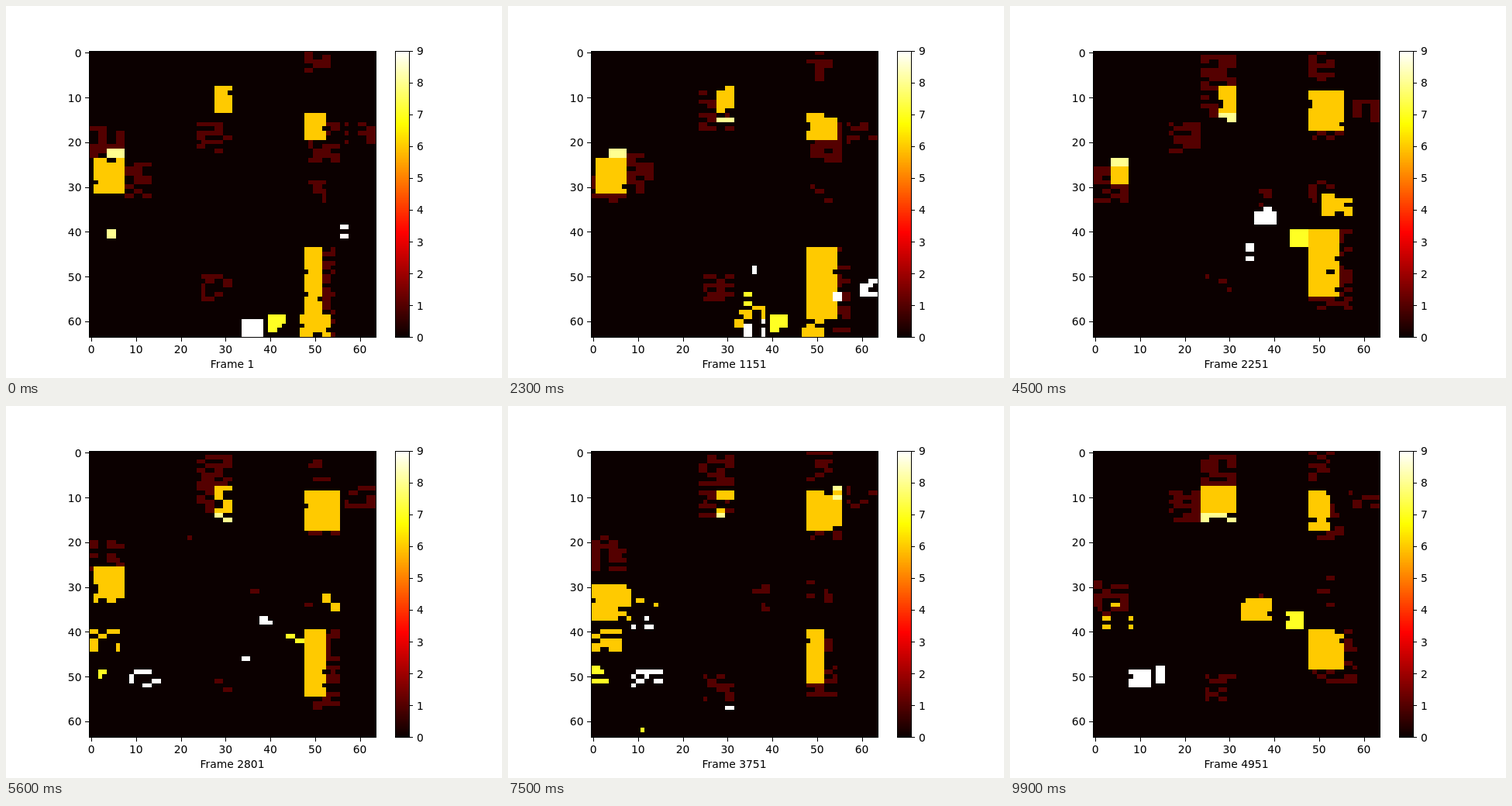
Animation of 640 by 480 pixels, one loop 10 s. Source, as an HTML page with a canvas:

```html
<!DOCTYPE html>
<html lang="en">
<head>
<meta charset="utf-8">
<title>Heat map</title>
<style>
html, body { margin: 0; width: 640px; height: 480px; overflow: hidden; background: #fff; }
canvas, svg { position: absolute; left: 0; top: 0; display: block; }
text { font: 13.889px "DejaVu Sans", sans-serif; fill: #000; }
</style>
</head>
<body>
<canvas id="plot" width="640" height="480"></canvas>
<svg id="labels" width="640" height="480"></svg>
<script>
const N = 64, LEFT = 107.2, TOP = 57.6, SIZE = 369.6;
const BAR_X = 502, BAR_W = 18;
const STEP = 100, LOOP = 10000;
const DARK = 1, GOLD = 6, LEMON = 7, CREAM = 8, WHITE = 9;
const ctx = document.getElementById('plot').getContext('2d');
const svg = document.getElementById('labels');
const grid = new Uint8Array(N * N);

function hash(x, y, seed) {
  let n = Math.imul(x + 11, 374761393) ^ Math.imul(y + 5, 668265263) ^ Math.imul(seed + 1, 1274126177);
  n = Math.imul(n ^ (n >>> 13), 1103515245);
  return ((n ^ (n >>> 16)) >>> 0) / 4294967296;
}

// Each pair of cells draws a new value at its own moment.
function noise(x, y, t) {
  const pair = x >> 1;
  return hash(pair, y, 2 + Math.floor(t / 1.5 + hash(pair, y, 1)));
}

// Smooth change from a to b between times t0 and t1.
function glide(t, a, b, t0, t1) {
  const u = Math.min(1, Math.max(0, (t - t0) / (t1 - t0)));
  return a + (b - a) * u * u * (3 - 2 * u);
}

const bump = (t, mid, width) => Math.exp(-(((t - mid) / width) ** 2));
const wave = (t, period) => Math.cos(2 * Math.PI * t / period);

// A ragged rectangle of one level.
function patch(t, level, x, y, w, h, density = 1) {
  const x0 = Math.round(x), y0 = Math.round(y);
  const x1 = Math.min(N, Math.round(x + w)), y1 = Math.min(N, Math.round(y + h));
  for (let r = y0; r < y1; r++) {
    for (let c = x0; c < x1; c++) {
      const rim = r === y0 || r === y1 - 1 || c === x0 || c === x1 - 1;
      if (noise(c, r, t) < density - (rim ? 0.08 : 0)) grid[r * N + c] = level;
    }
  }
}

// A cluster dissolves at each stop [time, column, row] and forms at the next.
function roam(t, level, w, h, stops) {
  stops.forEach(([start, x, y], i) => {
    const next = stops[i + 1];
    const rise = i ? glide(t, 0, 1, start - 0.5, start + 0.5) : 1;
    const fall = next ? glide(t, 1, 0, next[0] - 0.5, next[0] + 0.5) : 1;
    patch(t, level, x, y, w, h, 0.95 * rise * fall);
  });
}

function upperRight(t) {
  const y = glide(t, 14, 9, 3.2, 4.5);
  const w = glide(t, 5, 8, 1.2, 3) - glide(t, 0, 3, 8.5, 9.8);
  patch(t, DARK, 48, 0, 6, 7, 0.45);
  patch(t, DARK, 49, y + 2, 7, 9, 0.6);
  patch(t, DARK, 57, glide(t, 16, 8, 3, 5.5), 7, 5, 0.4);
  patch(t, DARK, 48, 28, 6, 7, 0.25);
  patch(t, GOLD, 48, y, w, glide(t, 6, 9, 3.2, 4.5), 0.98);
  patch(t, CREAM, 52, 8, 4, 3, 0.8 * bump(t, 6.7, 0.8));
}

function lowerRight(t) {
  const y = glide(t, 44, 40, 3.2, 4.5);
  const end = glide(t, 64, 55, 1.6, 3) - glide(t, 0, 6, 6.8, 8.2);
  const w = 6 - 2 * wave(t, 7);
  patch(t, DARK, 48, y, w + 3, end - y + 3, 0.5);
  patch(t, GOLD, 48, y, w, end - y, 0.98);
}

function upperMiddle(t) {
  const x = glide(t, 28, 24, 7, 9.5);
  const dip = bump(t, 6.7, 1);
  patch(t, DARK, 24, glide(t, 16, 1, 1.5, 3.2), 8, glide(t, 7, 14, 1.5, 4), 0.6);
  patch(t, DARK, 17, glide(t, 16, 9, 5, 9.5), 7, 7, 0.7 * (bump(t, 4.5, 0.8) + bump(t, 9.9, 0.9)));
  patch(t, GOLD, x, 8, 32 - x, 6, 0.98 - 0.9 * dip);
  patch(t, CREAM, x, 14, 32 - x, 2, glide(t, 0.1, 1, 1.5, 3.2) - dip);
}

function leftSide(t) {
  const x = 1 + 3 * bump(t, 4.5, 0.8) - glide(t, 0, 1, 5, 6.5);
  const y = glide(t, 24, 29, 4.8, 6.5) + glide(t, 0, 4, 7, 8.4);
  const fade = glide(t, 0.97, 0.1, 8.7, 9.8);
  patch(t, DARK, 8, glide(t, 24, 20, 1.8, 3.2), 6, 9, glide(t, 0.6, 0, 3.2, 4.5));
  patch(t, DARK, 0, 23 - 6 * wave(t, 6.7), 8, 8, 0.6);
  patch(t, GOLD, x, y, 8 - x + glide(t, 0, 2, 7, 8.4), 8 - 4 * bump(t, 3.7, 0.9), fade);
  patch(t, CREAM, 4, glide(t, 22, 24, 2, 3.2), 4, 2, glide(t, 1, 0, 4.8, 5.8));
  patch(t, CREAM, 4, 40, 4, 2, glide(t, 0.9, 0, 1.5, 2.5));
}

function centre(t) {
  patch(t, DARK, 25, 50, 7, 6, 0.6 - 0.5 * bump(t, 5, 2));
  patch(t, DARK, 36, 30, 4, 7, 0.5 * bump(t, 6.5, 2.5));
}

function travellers(t) {
  roam(t, GOLD, 7, 5, [[0, 47, 59], [2.3, 32, 57], [3.9, 51, 32], [5.6, 0, 40], [7.6, 8, 32], [9.2, 33, 33]]);
  roam(t, LEMON, 4, 4, [[0, 40, 59], [2.3, 32, 54], [3.9, 44, 40], [5.6, 0, 48], [7.6, 11, 60], [9.2, 43, 36]]);
  roam(t, WHITE, 5, 4, [[0, 34, 60], [2.3, 60, 51], [3.9, 36, 35], [5.6, 9, 49], [7.6, 9, 36], [9.2, 8, 49]]);
  roam(t, WHITE, 2, 4, [[0, 56, 39], [0.8, 54, 52], [2.3, 35, 48], [3.9, 34, 43], [5.6, 14, 48], [7.6, 30, 57], [9.2, 14, 48]]);
}

const regions = [upperRight, lowerRight, upperMiddle, leftSide, centre, travellers];

function hot(u) {
  const byte = v => Math.round(255 * Math.min(1, Math.max(0, v)));
  const r = 0.0416 + 2.6253 * u, g = (u - 0.3651) / 0.381, b = (u - 0.746) / 0.254;
  return `rgb(${byte(r)},${byte(g)},${byte(b)})`;
}

const shade = Array.from({ length: 10 }, (_, v) => hot(Math.min(255, Math.floor(v / 9 * 256)) / 255));

function bar(x, y, w, h, color = '#000') {
  ctx.fillStyle = color;
  ctx.fillRect(x, y, w, h);
}

function outline(x, y, w, h) {
  bar(x, y, w, 1);
  bar(x, y + h - 1, w, 1);
  bar(x, y, 1, h);
  bar(x + w - 1, y, 1, h);
}

function label(str, x, y, anchor) {
  const el = document.createElementNS(svg.namespaceURI, 'text');
  el.setAttribute('x', x);
  el.setAttribute('y', y);
  el.setAttribute('text-anchor', anchor);
  el.textContent = str;
  svg.append(el);
  return el;
}

function drawAxes() {
  bar(0, 0, 640, 480, '#fff');
  for (let v = 0; v <= 60; v += 10) {
    const d = SIZE / N * (v + 0.5);
    bar(Math.round(LEFT + d), 428, 1, 5);
    bar(102, Math.round(TOP + d), 5, 1);
    label(v, LEFT + d, 448, 'middle');
    label(v, 97.5, Math.round(TOP + d + 5.5), 'end');
  }
  for (let i = 0; i < 256; i++) {
    const y = Math.round(TOP + SIZE * (255 - i) / 256);
    bar(BAR_X, y, BAR_W, Math.round(TOP + SIZE * (256 - i) / 256) - y, hot(i / 255));
  }
  outline(BAR_X, 58, BAR_W + 1, 370);
  for (let v = 0; v <= 9; v++) {
    const y = TOP + SIZE * (1 - v / 9);
    bar(521, Math.round(y), 4, 1);
    label(v, 530, Math.round(y + 5.5), 'start');
  }
}

function drawCells(t) {
  const edge = (start, i) => Math.round(start + 370 / N * i);
  grid.fill(0);
  for (const region of regions) region(t);
  ctx.save();
  ctx.beginPath();
  ctx.rect(107, 58, 371, 370);
  ctx.clip();
  for (let y = 0; y < N; y++) {
    for (let x = 0; x < N; x++) {
      const x0 = edge(107, x), y0 = edge(57, y);
      bar(x0, y0, edge(107, x + 1) - x0, edge(57, y + 1) - y0, shade[grid[y * N + x]]);
    }
  }
  ctx.restore();
  outline(107, 58, 371, 370);
}

drawAxes();
const caption = label('', 292, 467, 'middle');
const began = performance.now();
let last = -1;

function tick() {
  const step = Math.floor(((performance.now() - began) % LOOP) / STEP);
  if (step !== last) {
    last = step;
    drawCells(step * STEP / 1000);
    caption.textContent = 'Frame ' + (1 + 50 * step);
  }
  requestAnimationFrame(tick);
}
tick();
</script>
</body>
</html>
```
